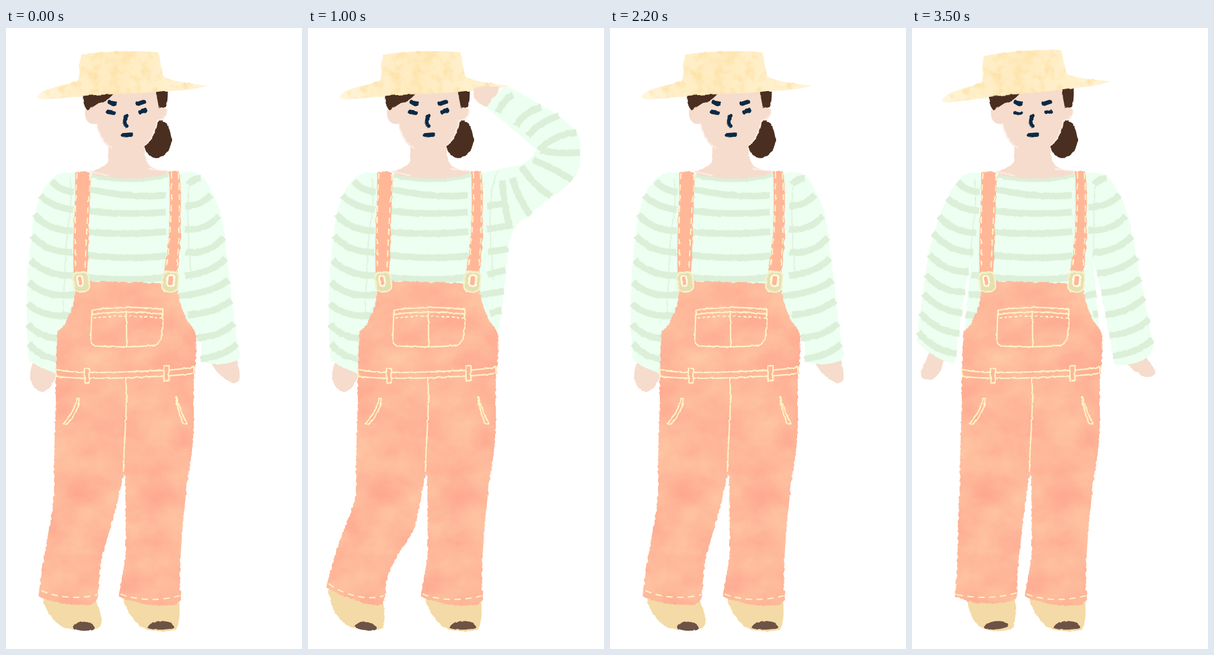
An HTML page that plays this animation: 517x1083 px, repeating every 3800 ms.

```html
<!DOCTYPE html>
<html lang="en">
<head>
<meta charset="utf-8">
<title>Woman in a straw hat</title>
<style>
html, body { margin: 0; width: 100%; height: 100%; overflow: hidden; background: #fff; }
svg { display: block; width: 100vw; height: 100vh; }
path { fill: none; }
.skin { fill: #f6dccc; }
.hair { fill: #4a2e20; }
.shirt { fill: #ecfff0; }
.stripe { stroke: #dcefd8; stroke-width: 11.5; }
.seam { stroke: #dcefd8; stroke-width: 1.5; }
.ink { stroke: #0b2a45; stroke-width: 7.5; stroke-linecap: round; }
.thin { stroke-width: 5.5; }
.cloth { fill: #ffb798; filter: url(#wash); }
.strap { fill: #ffb798; }
.line { stroke: #fff4c4; stroke-width: 2.4; stroke-linejoin: round; }
.dash { stroke: #fff4c4; stroke-width: 2.2; stroke-dasharray: 11 8; }
.shoe { fill: #f4daa6; }
.toe { fill: #6d5345; }
.rough { filter: url(#rough); }
</style>
</head>
<body>
<svg viewBox="0 0 517 1083" preserveAspectRatio="none">
<defs>
  <filter id="rough" filterUnits="userSpaceOnUse" x="0" y="0" width="517" height="1083" color-interpolation-filters="sRGB">
    <feTurbulence type="fractalNoise" baseFrequency=".12" numOctaves="2" seed="4"/>
    <feDisplacementMap in="SourceGraphic" scale="3.5" xChannelSelector="R" yChannelSelector="A"/>
  </filter>
  <filter id="wash" filterUnits="userSpaceOnUse" x="0" y="0" width="517" height="1083" color-interpolation-filters="sRGB">
    <feTurbulence type="fractalNoise" baseFrequency=".014 .018" numOctaves="6" seed="11" result="n"/>
    <feColorMatrix in="n" values="0 0 0 0 .996  0 0 0 .17 .637  0 0 0 .11 .55  0 0 0 0 1" result="paint"/>
    <feTurbulence type="fractalNoise" baseFrequency=".15" numOctaves="2" seed="7" result="edge"/>
    <feDisplacementMap in="SourceGraphic" in2="edge" scale="5" xChannelSelector="R" yChannelSelector="A" result="shape"/>
    <feComposite in="paint" in2="shape" operator="in"/>
  </filter>
  <filter id="straw" filterUnits="userSpaceOnUse" x="0" y="0" width="517" height="200" color-interpolation-filters="sRGB">
    <feTurbulence type="fractalNoise" baseFrequency=".055" numOctaves="4" seed="3" result="n"/>
    <feColorMatrix in="n" values="0 0 0 0 .99  0 0 0 0 .86  0 0 0 0 .59  0 0 0 1.8 -.8" result="spots"/>
    <feDisplacementMap in="SourceGraphic" in2="n" scale="3" xChannelSelector="R" yChannelSelector="A" result="shape"/>
    <feComposite in="spots" in2="shape" operator="atop"/>
  </filter>
  <linearGradient id="brim">
    <stop offset="0" stop-color="#fff6de"/><stop offset=".18" stop-color="#fff0cb"/>
    <stop offset=".45" stop-color="#ffebc0"/><stop offset=".75" stop-color="#fff0cb"/>
    <stop offset="1" stop-color="#fff6de"/>
  </linearGradient>
  <path id="hat" style="fill:url(#brim);filter:url(#straw)" d="M131 47C150 41 245 38 266 43C270 55 272 70 274 83C280 92 325 97 351 101C330 108 290 110 275 110C230 116 150 115 120 120C95 123 62 126 55 121C55 112 70 108 85 103C105 98 122 96 127 90C128 75 128 60 131 47Z"/>
</defs>

<!-- head -->
<g class="rough">
  <path class="hair" d="M270 160C282 162 290 185 289 198C287 215 275 227 262 227C250 226 241 215 243 205C248 190 256 170 270 160Z"/>
  <path class="skin" d="M140 98L140 138C135 146 138 166 150 167L158 168C163 190 172 203 179 207L178 230C175 244 160 246 147 250L170 275L260 275L285 250C250 246 247 240 242 222L243 205C255 192 262 175 264 161C276 162 283 152 281 141L270 137L270 100Z"/>
  <path d="M158 166C163 190 172 203 186 209M281 145C280 157 270 162 264 162C262 178 254 193 243 205M146 250L180 258M249 245L285 250" stroke="#fdebe3" stroke-width="2.5"/>
  <path class="hair" d="M138 94C133 110 132 133 142 143C150 141 155 133 166 130C179 126 185 118 192 110L207 98ZM261 100C262 118 266 130 267 140L279 138C283 130 283 110 282 100Z"/>
  <path class="ink" d="M181 130L190 132M231 132L240 129"/>
  <path class="ink" style="stroke-width:6" d="M211 153C206 160 206 166 211 172"/>
</g>
<g class="rough" data-on="axm"><path class="ink" d="M178 146L188 148M235 147L243 143"/></g>
<g class="rough" data-on="s"><path class="ink thin" d="M178 145L188 148M233 146L243 142"/></g>
<g class="rough" data-on="b"><path class="ink thin" d="M180 148Q186 150 191 148M234 147Q240 148 243 145"/></g>
<g class="rough" data-on="axmb"><path class="ink" d="M205 187L218 186"/></g>
<g class="rough" data-on="s"><path class="ink" d="M205 188Q213 188 218 184"/></g>

<g data-on="axm"><use href="#hat"/></g>
<g data-on="b"><use href="#hat" transform="translate(-3 -1) rotate(-2.7 203 110.5)"/></g>

<!-- shirt -->
<g class="rough">
  <path class="shirt" d="M100 256C115 249 135 251 147 256C190 268 245 268 285 253C305 250 318 252 325 256L316 402L322 470L327 530L92 530L97 470L104 400Z"/>
  <path class="stripe" d="M146 281Q215 297 279 292M143 319Q215 327 279 321M143 356Q215 362 280 355M142 396Q215 405 280 397M142 435Q215 442 275 435M104 431L118 432M99 465L120 465M94 500L112 502M302 467L322 463M316 499L325 498"/>
  <path class="stripe" style="stroke-width:6" d="M149 258C190 268 245 269 284 256"/>
</g>

<!-- left arm -->
<g class="rough" data-on="axms">
  <path class="skin" d="M47 585C60 588 75 595 87 600C85 618 78 630 66 634C55 636 45 625 43 612C41 600 44 592 47 585Z"/>
  <path class="shirt" d="M118 254C95 246 75 262 62 288C45 330 42 390 38 430C35 480 36 540 40 580C55 590 70 596 88 603L92 530L110 460L118 300Z"/>
  <path class="stripe" d="M80 267Q92 283 118 286M60 292Q80 312 117 317M50 325Q72 353 117 354M45 362Q72 392 116 391M43 405Q72 433 117 432M40 443Q70 472 120 465M38 480Q62 505 114 502M38 517Q62 541 92 541M40 550Q60 575 90 577"/>
  <path class="seam" d="M111 262Q118 285 108 350Q101 430 100 500"/>
</g>
<g class="rough" data-on="b">
  <path class="skin" d="M30 566C40 570 50 576 56 578C54 595 45 610 32 614C20 615 14 608 15 600C20 590 25 580 30 566Z"/>
  <path class="shirt" d="M118 254C95 248 80 262 68 285C50 320 35 360 28 400C20 450 12 510 9 545C25 565 50 582 75 585C80 540 92 450 104 400L118 300Z"/>
  <path class="stripe" d="M80 268Q92 284 118 286M62 297Q82 316 117 319M47 328Q72 357 112 357M37 358Q67 391 107 391M30 395Q60 427 99 425M24 430Q55 463 93 460M20 463Q48 494 88 497M15 497Q42 529 83 533M11 530Q38 563 78 568"/>
  <path class="seam" d="M109 264Q115 290 106 350L103 400"/>
</g>

<!-- right arm -->
<g class="rough" data-on="a">
  <path class="skin" d="M360 586C372 580 392 580 404 580C408 597 410 612 406 617C394 624 372 608 360 586Z"/>
  <path class="shirt" d="M306 253C335 244 350 262 356 280C375 310 382 350 384 390C392 440 396 490 402 535C404 555 406 562 409 567C408 580 398 582 390 584C372 588 355 586 341 582L341 540L330 530L300 460L306 300Z"/>
  <path class="stripe" d="M318 273Q327 262 340 262M313 311Q340 310 358 291M313 351Q350 354 371 328M313 391Q355 396 380 365M313 432Q358 428 384 402M300 467Q355 464 389 440M318 500Q366 497 394 475M333 541Q376 537 399 515M339 577Q380 573 403 551"/>
  <path class="seam" d="M322 268Q316 280 318 350L324 440"/>
</g>
<g class="rough" data-on="x">
  <path class="skin" d="M416 204C418 180 425 160 440 158C458 158 468 175 468 202Z"/>
  <path class="shirt" d="M306 253C345 248 370 275 405 300C408 270 410 230 412 200L470 196C480 240 492 300 495 345C492 375 460 385 435 375C405 365 375 360 355 385C348 420 342 480 332 530L310 500L300 460L306 300Z"/>
  <path class="stripe" d="M412 222L475 217M409 258L483 250M406 294L489 286M408 303L492 330M402 303Q418 340 428 372M375 281Q390 325 392 362M348 264Q362 310 360 370M313 311L342 306M313 351L350 345M314 391L350 385M314 430L346 422M300 466L342 459M318 498L338 492"/>
  <path class="seam" d="M322 268Q316 280 318 350L324 440"/>
</g>
<g class="rough" data-on="ms">
  <path class="skin" d="M290 105C305 101 320 100 335 104L316 139C300 135 290 125 289 115Z"/>
  <path class="shirt" d="M306 253C330 246 350 243 372 239C385 233 395 222 400 213C380 195 345 165 313 139C318 128 330 108 348 103C365 108 390 125 420 142C445 158 465 172 473 188C478 205 476 225 474 245C465 270 440 285 415 303C395 320 375 330 360 350C350 365 350 390 348 410C342 450 340 490 332 530L310 500L300 460L306 300Z"/>
  <path class="stripe" d="M331 147Q340 128 358 116M363 171Q376 148 407 138M384 188Q404 164 438 153M404 213Q430 186 469 182M406 214Q440 220 475 217M393 230Q428 244 461 265M373 241Q394 276 425 293M357 262Q367 298 388 326M339 266Q342 310 353 350M313 311L341 306M313 351L350 345M314 391L349 385M314 430L345 422M300 466L342 459M318 498L338 492"/>
  <path class="seam" d="M332 250Q316 275 318 350L324 440"/>
</g>
<g class="rough" data-on="b">
  <path class="skin" d="M374 584C388 582 398 576 405 571C415 580 425 595 425 602C420 610 410 610 402 607C390 600 382 592 374 584Z"/>
  <path class="shirt" d="M306 253C335 246 350 265 356 280C375 310 385 350 390 390C402 450 412 500 421 555C418 580 385 590 354 587C345 540 330 450 316 402L306 330Z"/>
  <path class="stripe" d="M318 273Q327 262 340 262M308 313Q345 311 362 291M308 353Q352 354 373 328M316 392Q358 390 384 363M323 428Q364 425 393 400M330 462Q370 460 399 437M338 500Q380 496 406 470M345 536Q390 532 414 507M351 572Q396 566 420 543"/>
  <path class="seam" d="M322 268Q316 290 318 350L316 400"/>
</g>

<!-- shoes and legs -->
<g class="rough">
  <path class="shoe" d="M203 990C210 1015 225 1045 250 1050C265 1053 290 1053 298 1048C304 1035 304 1015 302 995Z"/>
  <path class="toe" d="M247 1046C252 1034 270 1032 285 1036C296 1043 295 1048 285 1048C272 1050 255 1050 247 1046Z"/>
</g>
<g data-on="ax">
  <g class="rough">
    <path class="shoe" d="M62 985C65 1005 75 1030 95 1042C110 1050 135 1053 160 1047C170 1040 168 1030 163 1015L155 995Z"/>
    <path class="toe" d="M116 1046C120 1035 135 1034 145 1037C155 1042 158 1048 152 1050C140 1052 125 1052 116 1046Z"/>
  </g>
  <path class="cloth" d="M85 740L206 740L205 780C195 830 180 880 168 920C163 950 162 970 161 990C155 1010 140 1007 130 1006C100 1005 75 1000 57 991C60 960 68 915 72 890C80 850 84 830 84 790Z"/>
  <path class="dash" d="M62 981C85 993 130 997 160 988"/>
</g>
<g data-on="m">
  <g class="rough">
    <path class="shoe" d="M35 975C38 1005 48 1025 65 1040C85 1052 120 1053 131 1046C136 1030 133 1010 130 995Z"/>
    <path class="toe" d="M81 1044C87 1032 105 1033 118 1043C122 1050 115 1052 105 1051C95 1049 87 1049 81 1044Z"/>
  </g>
  <path class="cloth" d="M85 740L206 740L205 780C197 820 190 860 183 880C165 905 145 935 138 960C135 975 136 990 131 1004C120 1011 80 1001 32 976C35 960 38 950 44 930C55 890 70 860 83 820L84 790Z"/>
  <path class="dash" d="M36 969C60 988 105 1000 132 990"/>
</g>
<g data-on="s">
  <g class="rough">
    <path class="shoe" d="M9 960C10 985 15 1010 25 1025C40 1040 70 1048 92 1047C98 1035 100 1015 97 990Z"/>
    <path class="toe" d="M45 1031C50 1024 65 1025 75 1035C84 1045 82 1047 75 1046C62 1044 50 1040 45 1031Z"/>
  </g>
  <path class="cloth" d="M85 740L206 740L205 780C197 820 190 850 185 865C170 895 135 925 120 955C110 970 105 985 104 998C90 1003 60 1000 40 985C25 975 15 965 9 957C12 945 18 935 25 922C45 890 70 850 84 815L84 780Z"/>
  <path class="dash" d="M14 945C30 972 75 990 107 988"/>
</g>
<g data-on="b">
  <g class="rough">
    <path class="shoe" d="M96 992C98 1015 105 1035 120 1045C135 1054 165 1054 177 1045C182 1030 181 1010 181 992Z"/>
    <path class="toe" d="M125 1046C132 1034 150 1032 163 1036C172 1040 168 1045 158 1047C145 1050 132 1050 125 1046Z"/>
  </g>
  <path class="cloth" d="M85 740L206 740L206 776C198 820 193 870 187 920C185 950 183 970 184 988C180 1004 150 1002 130 1004C105 1002 90 998 75 991C79 960 80 900 81 850C82 820 84 800 84 770Z"/>
  <path class="dash" d="M78 988C110 995 150 995 183 985"/>
</g>

<!-- overalls -->
<path class="cloth" d="M140 442C180 441 230 445 274 445L300 458C303 480 310 505 330 528C336 550 330 590 328 620C328 660 329 690 327 712C325 750 318 775 315 810C308 860 304 930 303 980C310 990 304 1002 295 1006C260 1011 220 1002 197 991C200 965 208 940 209 910C210 860 208 820 208 783L204 776L84 776C84 730 86 690 87 650C86 610 88 570 90 530C107 515 118 490 121 458Z"/>
<path class="dash" d="M200 987C225 998 270 1000 303 990"/>
<g class="rough">
  <path class="strap" d="M121 252C130 249 140 250 148 253C147 290 145 330 144 370C143 400 143 415 141 430L118 428C117 390 118 350 120 310ZM285 250L303 250C306 280 306 330 305 360C304 390 302 415 299 430L277 428C280 400 285 370 286 330C286 300 286 270 285 250Z"/>
  <path class="dash" d="M124 253Q119 330 122 425M147 255Q141 340 138 425M289 252Q291 330 280 425M301 252Q306 330 298 425"/>
  <g fill="#e5e0b0" stroke="#f5f1cb" stroke-width="3">
    <rect x="118" y="426" width="27" height="34" rx="9" transform="rotate(-6 131 443)"/>
    <rect x="273" y="425" width="28" height="35" rx="9" transform="rotate(6 287 443)"/>
  </g>
  <g fill="#ffb798" stroke="#fffbe2" stroke-width="3">
    <rect x="125" y="432" width="9" height="18" rx="4" transform="rotate(-10 130 441)"/>
    <rect x="282" y="431" width="11" height="19" rx="4" transform="rotate(6 287 441)"/>
  </g>
  <path class="line" d="M150 492C190 486 235 486 274 491L274 500M150 492L148 545C148 552 155 555 165 555C200 557 240 556 260 553C272 550 275 530 274 493M150 500C190 493 235 495 274 499M210 496L211 555"/>
  <path class="line" stroke-dasharray="5 4" d="M152 506C190 501 235 502 274 506"/>
  <path class="line" d="M87 595C110 603 190 601 250 598C290 597 315 594 329 591M87 607C110 612 190 612 250 608C290 607 315 604 328 602L329 591M87 595L87 607M209 611C213 650 207 700 205 774"/>
  <path class="line" style="fill:#ffb598" d="M137 594L145 594L145 619L138 619ZM276 589L285 589L284 615L276 616Z"/>
  <path class="line" d="M124 646C122 662 110 680 100 690L106 691C118 680 126 665 128 646ZM296 643C299 660 304 680 311 691L316 690C309 677 301 660 298 643Z"/>
</g>

<g data-on="s"><use href="#hat" transform="translate(4 -14) rotate(7.9 203 110.5)"/></g>
</svg>
<script>
// Poses: a rest, x arm rising, m hand at brim, s hat tipped, b arms out
const LOOP = 3800;
const steps = [
  [0, 'a'], [200, 'x'], [400, 'm'], [600, 's'], [1000, 'm'], [1200, 'x'],
  [1400, 'a'], [1900, 'b'], [2200, 'a'], [2700, 'b'], [3000, 'a'], [3500, 'b'], [LOOP, 'b']
];
for (const part of document.querySelectorAll('[data-on]')) {
  const frames = steps.map(([t, pose]) => ({
    offset: t / LOOP,
    opacity: part.dataset.on.includes(pose) ? 1 : 0,
    easing: 'steps(1, end)'
  }));
  part.animate(frames, { duration: LOOP, iterations: Infinity });
}
</script>
</body>
</html>
```
